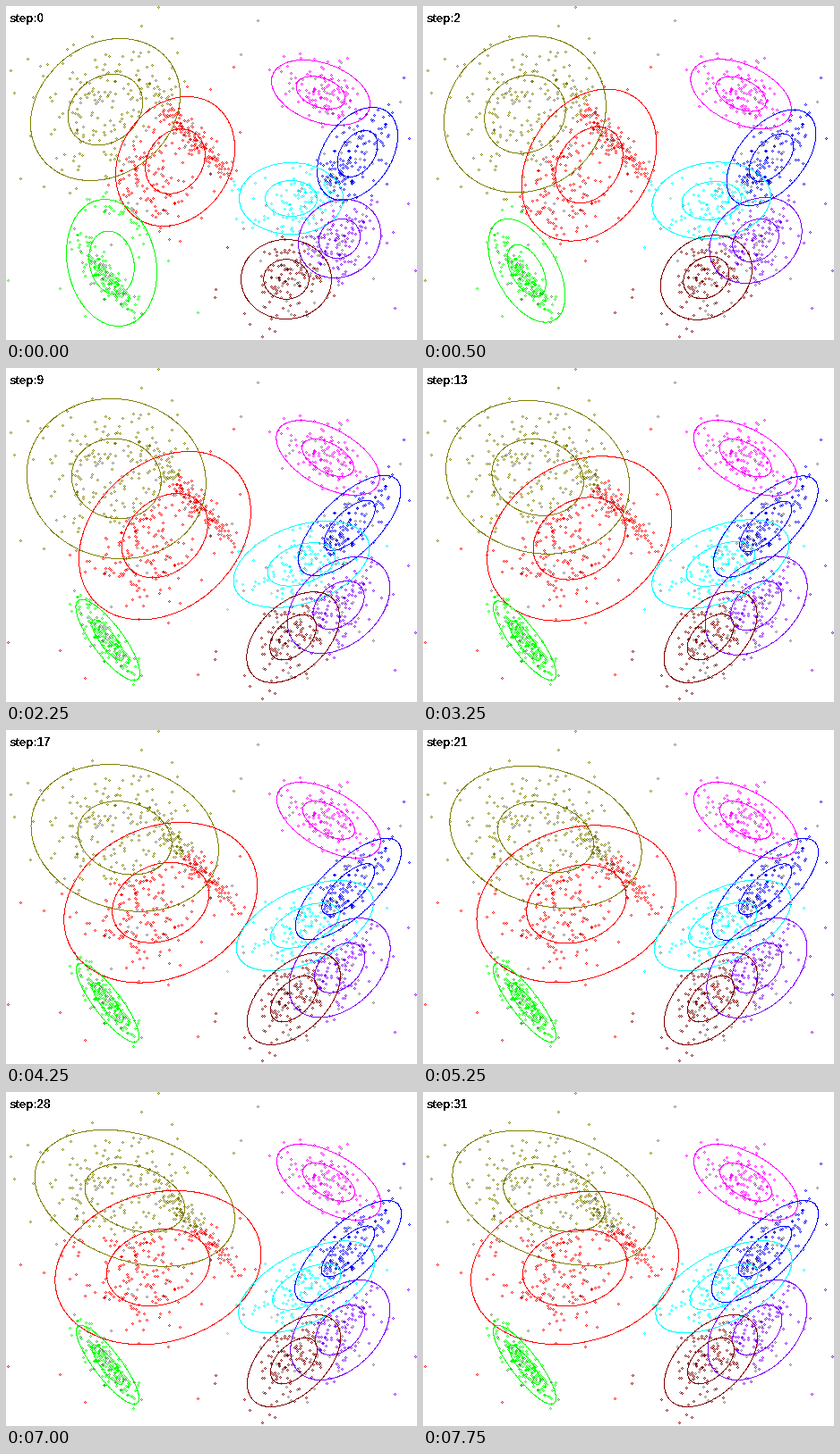
Write a matplotlib script that moves like this. It is 459x374 px and loops after 8 s.

```python
import numpy as np
import matplotlib.pyplot as plt
from matplotlib.animation import FuncAnimation

W, H, DPI = 459, 374, 64
STEPS, INTERVAL = 32, 250
SWELL_PEAK = 6  # step at which a passing swell is largest
GRAY = (120, 120, 120)


class Cluster:
    """A tilted ellipse (centre x, y, half width, half height, tilt) that settles."""

    def __init__(self, color, start, end, tau, swell=(0, 0, 0, 0, 0)):
        self.color, self.tau = color, tau
        self.start, self.end, self.swell = map(np.array, (start, end, swell))

    def at(self, step):
        settled = np.expm1(-step / self.tau) / np.expm1((1 - STEPS) / self.tau)
        t = step / SWELL_PEAK
        return (self.start + (self.end - self.start) * settled
                + self.swell * t * np.exp(1 - t))


olive = Cluster((128, 128, 0), (110.5, 115.5, 83.5, 79.5, -.2),
                (146, 117.5, 113, 74.5, .33), 60, (0, 8, 7, 13, .08))
red = Cluster((255, 0, 0), (188.5, 173.5, 66.5, 72.5, -.2),
              (169, 196.5, 116, 84.5, -.15), 11, (0, 0, 0, 16, -.12))
green = Cluster((0, 255, 0), (117.5, 287, 50.5, 71, .15), (113, 305, 35, 44, .85), 3)
magenta = Cluster((255, 0, 255), (351, 96.5, 55, 36.5, .35),
                  (360, 100.5, 58, 42.5, .55), 4)
blue = Cluster((0, 0, 255), (392, 165, 45, 52, -.38), (381.5, 178, 59.5, 57, -.74), 5)
cyan = Cluster((0, 255, 255), (318, 215, 58, 40, 0),
               (335.5, 217.5, 75.5, 51.5, -.57), 9, (0, 3, 7, 1, 0))
purple = Cluster((128, 0, 255), (372, 260, 46, 44, -.12),
                 (373, 266, 55, 56, -.4), 5, (-2, 0, 4, 0, 0))
maroon = Cluster((128, 0, 0), (312.5, 305.5, 50.5, 44.5, 0),
                 (321, 300.5, 52, 51.5, -.5), 4)
CLUSTERS = [olive, red, green, magenta, blue, cyan, purple, maroon]
COLORS = np.array([c.color for c in CLUSTERS], np.uint8)


def skew(x, y, shape):
    """Map unit-circle coordinates onto a tilted ellipse."""
    cx, cy, a, b, rho = shape
    return cx + a * x, cy + b * (rho * x + np.sqrt(1 - rho ** 2) * y)


def cloud(rng, shape, count):
    """Normal scatter inside an ellipse of two standard deviations."""
    angle = rng.uniform(0, 2 * np.pi, count)
    r = np.minimum(rng.rayleigh(.46, count), 1.25)
    return np.column_stack(skew(r * np.cos(angle), r * np.sin(angle), shape))


def make_points():
    rng = np.random.default_rng(7)
    parts = [rng.uniform((0, 0), (W, H), (45, 2))]
    # The two wide ellipses share two round clouds and a thin diagonal one.
    parts += [cloud(rng, s, 175) for s in [(110, 111, 82, 78, 0), (156, 206, 74, 70, 0),
                                           (206, 143, 56, 61, .95)]]
    parts += [cloud(rng, c.end, 190 if c is green else 140) for c in CLUSTERS[2:]]
    xy = np.round(np.vstack(parts)).astype(int)
    return xy, rng.random(len(xy)) < .14


def score(shape):
    """Log density of every point under one ellipse."""
    cx, cy, a, b, rho = shape
    u, v = (points[:, 0] - cx) / (a / 2), (points[:, 1] - cy) / (b / 2)
    k = 1 - rho ** 2
    return -(u * u - 2 * rho * u * v + v * v) / (2 * k) - np.log(a * b * np.sqrt(k))


def plot_pixels(canvas, x, y, color):
    inside = (x >= 0) & (x < W) & (y >= 0) & (y < H)
    color = np.broadcast_to(color, (len(x), 3))
    canvas[y[inside], x[inside]] = color[inside]


def plot_dots(canvas, colors):
    """Each dot is four pixels around an empty centre."""
    x, y = points.T
    for dx, dy in [(0, 1), (1, 0), (0, -1), (-1, 0)]:
        plot_pixels(canvas, x + dx, y + dy, colors)


def plot_ring(canvas, shape, scale, color):
    # About one sample per pixel keeps the outline thin.
    count = int(2 * np.pi * scale * np.hypot(shape[2], shape[3]))
    t = np.linspace(0, 2 * np.pi, count)
    x, y = skew(scale * np.cos(t), scale * np.sin(t), shape)
    plot_pixels(canvas, np.round(x).astype(int), np.round(y).astype(int), color)


def draw(step):
    canvas = np.full((H, W, 3), 255, np.uint8)
    shapes = [c.at(step) for c in CLUSTERS]
    owner = np.argmax([score(s) for s in shapes], axis=0)
    colors = COLORS[owner]
    colors[is_gray] = GRAY
    plot_dots(canvas, colors)
    for shape, color in zip(shapes, COLORS):
        for scale in (1, .5):
            plot_ring(canvas, shape, scale, color)
    picture.set_data(canvas)
    label.set_text(f"step:{step}")
    return picture, label


points, is_gray = make_points()

plt.rcParams["text.hinting"] = "default"
fig = plt.figure(figsize=(W / DPI, H / DPI), dpi=DPI, facecolor="white")
ax = fig.add_axes([0, 0, 1, 1])
ax.axis("off")
picture = ax.imshow(np.full((H, W, 3), 255, np.uint8), interpolation="nearest",
                    aspect="auto")
label = ax.text(3.5, 17.5, "", family="Liberation Sans", weight="bold",
                size=13.2 * 72 / DPI, color="black", va="baseline", antialiased=False)

anim = FuncAnimation(fig, draw, frames=STEPS, interval=INTERVAL, repeat=True,
                     repeat_delay=0, blit=False)
plt.show()
```
